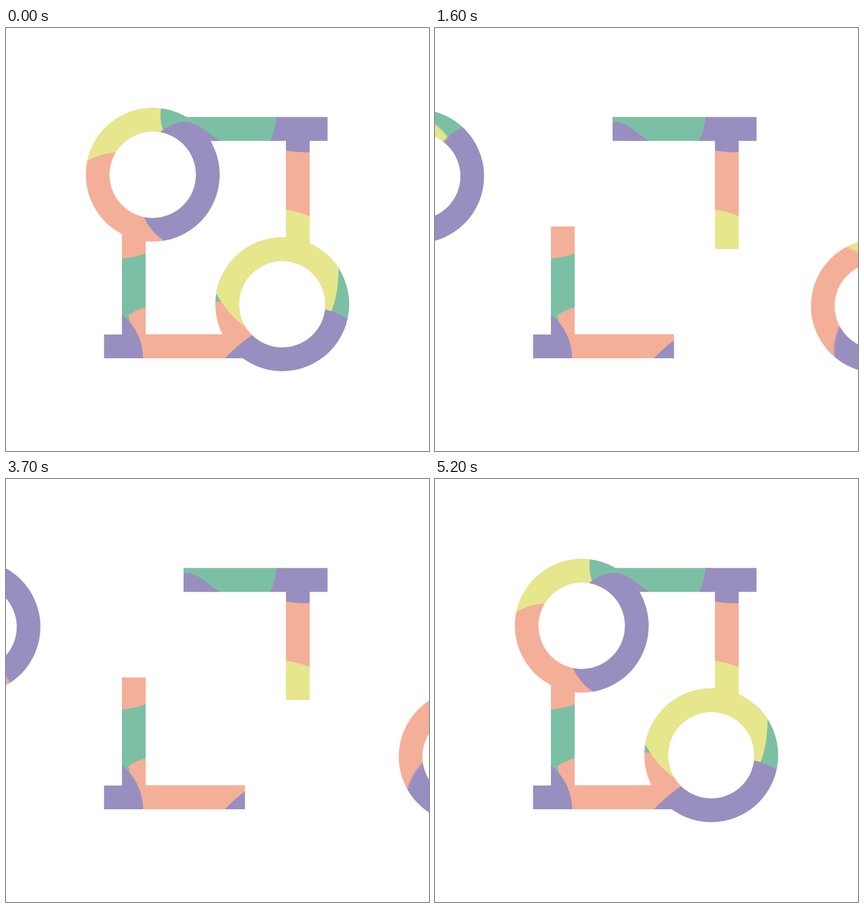
Animation, 748 px wide and 748 px high, one loop 5.25 s. Source, as an HTML page:

```html
<!DOCTYPE html>
<html lang="en">
<head>
<meta charset="utf-8">
<title>Rolling rings</title>
<style>
  html, body { margin: 0; width: 100%; height: 100%; overflow: hidden; background: #fff; }
  svg { display: block; width: 100%; height: 100%; }
  .yellow { fill: #e6e68c; }
  .green { fill: #7bc0a5; }
  .purple { fill: #988fc0; }
  .salmon { fill: #f4af98; }
</style>
</head>
<body>
<svg viewBox="0 0 748 748">
  <defs>
    <g id="paint">
      <rect class="salmon" width="748" height="748"/>
      <!-- upper left ring and top bar -->
      <path class="yellow" d="M274 110V142C272 158 274 172 279 184L259 259L194 220Q168 221 144 235L110 250V110Z"/>
      <path class="green" d="M274 110V142C272 158 274 172 279 184L360 205H490V110Z"/>
      <path class="purple" d="M259 259L273 184Q294 166 316 166C342 166 352 184 380 200L390 206V395H296L279 376Q257 362 244 335Z"/>
      <path class="purple" d="M478.5 150V157.5Q476 182 467 199.5L466 202L495 216.5Q515 220.5 537 219.5L580 219V150Z"/>
      <!-- lower right ring -->
      <path class="green" d="M560 400H640V530H560ZM350 430H385V484H350Z"/>
      <path class="yellow" d="M480 319Q515 323 537 333L588 360V426C588 455 584 480 575 502L488 488L421 527Q394 508 372 470L355 440L400 380Z"/>
      <path class="purple" d="M488 488L565 498Q585 502 604 514L640 530V630H340L387 584Q409 561 435 543Z"/>
      <!-- left bar -->
      <path class="green" d="M195 408L205 407.5Q230 406 247 398L255 394V492L247 494Q228 499 216.5 508L219 520H195Z"/>
      <path class="purple" d="M160 500H197L205 506.5A98.8 98.8 0 0 1 242.5 584V600H160Z"/>
    </g>
    <clipPath id="bars">
      <path d="M314 157.5H568.5V199.5H537V390.5H495V199.5H314ZM205 351H247V541.5H422.5V584H173.5V542H205Z"/>
    </clipPath>
    <clipPath id="ring">
      <path clip-rule="evenodd" d="M-118.3 0a118.3 118.3 0 1 1 236.6 0a118.3 118.3 0 1 1 -236.6 0ZM-76.4 0a76.4 76.4 0 1 1 152.8 0a76.4 76.4 0 1 1 -152.8 0Z"/>
    </clipPath>
  </defs>
  <use href="#paint" clip-path="url(#bars)"/>
  <g id="leftward" clip-path="url(#ring)"><g><use href="#paint" x="-259.5" y="-259.5"/></g></g>
  <g id="rightward" clip-path="url(#ring)"><g><use href="#paint" x="-488.5" y="-488.5"/></g></g>
</svg>
<script>
const STEP_MS = 50, STEPS = 105;
const WRAP = 26;  // step at which each ring re-enters on the other side
const TURN = 10;  // degrees per step

function leftward(step) {
  const since = step - WRAP;
  return since < 0
    ? { x: 259.5 - 14.8 * step, y: 259.5 + 0.07 * step, angle: -TURN * step }
    : { x: 872.2 - 14.85 * since, y: 489.6 + 0.33 * since, angle: -TURN * (step - 1) };
}

function rightward(step) {
  const since = step - WRAP;
  const moved = step > 10 ? step - 1 : step; // rests for one step on the way out
  return since < 0
    ? { x: 488.5 + 15.1 * moved, y: 488.5 + 0.05 * step, angle: TURN * moved }
    : { x: -107.2 + 12.1 * since + 0.087 * since ** 2, y: 260 + 0.36 * since, angle: TURN * (step - 2) };
}

function place(id, { x, y, angle }, blur) {
  const ring = document.getElementById(id);
  const face = ring.firstElementChild;
  ring.setAttribute('transform', `translate(${x} ${y})`);
  face.setAttribute('transform', `rotate(${angle})`);
  face.style.filter = blur ? `blur(${blur}px)` : 'none';
}

function draw(time) {
  const tick = Math.floor(time / STEP_MS) % STEPS;
  const there = Math.min(tick, STEPS - 1 - tick);
  const step = there >= 50 ? there - 1 : there; // one held step before turning back
  const blur = 0.3 * Math.sqrt(step); // colour borders soften with every turn
  place('leftward', leftward(step), blur);
  place('rightward', rightward(step), blur);
}

const start = performance.now();
function loop() {
  draw(performance.now() - start);
  requestAnimationFrame(loop);
}
loop();
</script>
</body>
</html>
```
